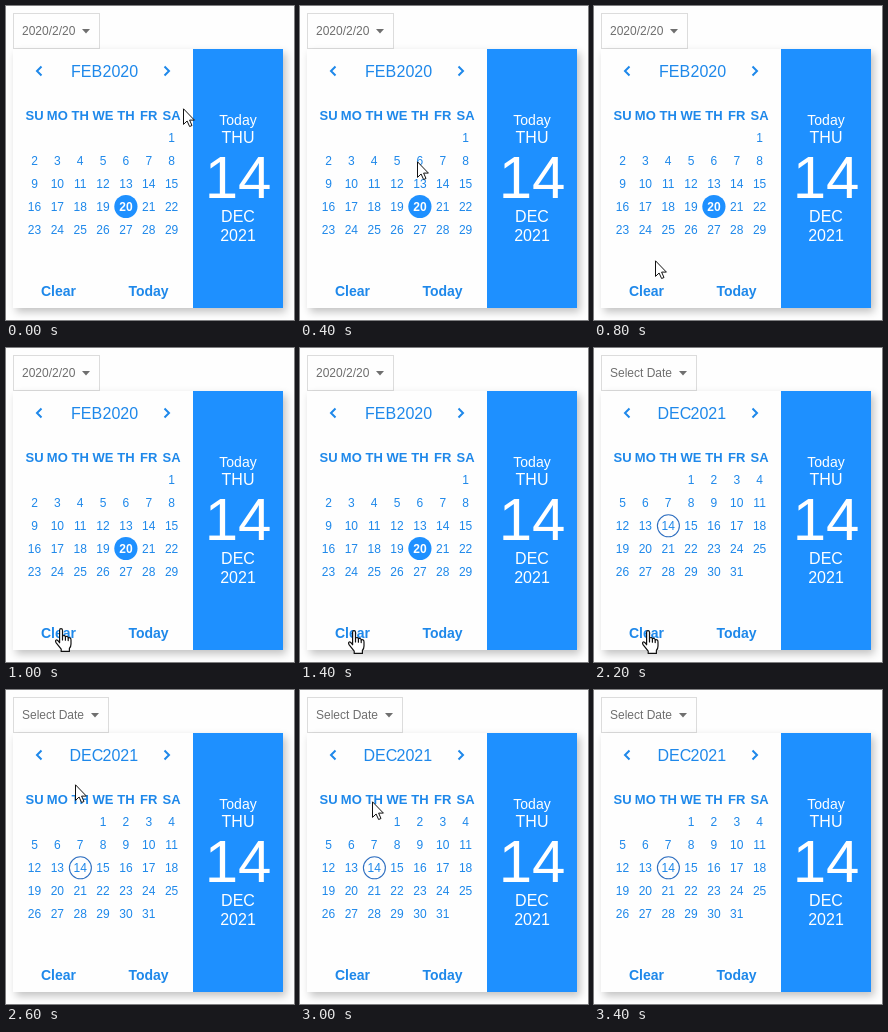
An HTML page that plays this animation: 288x314 px, repeating every 4 s.

```html
<!DOCTYPE html>
<html lang="en">
<head>
<meta charset="utf-8">
<title>Date picker</title>
<style>
html, body { margin: 0; width: 100%; height: 100%; overflow: hidden; background: #fefefe; }
#stage { position: absolute; left: 0; top: 0; width: 288px; height: 314px; overflow: hidden; }
#field { position: absolute; left: 7px; top: 7px; height: 36px; box-sizing: border-box; border: 1px solid #dcdcdc; }
#popup { position: absolute; left: 7px; top: 43px; width: 270px; height: 259px;
  background: linear-gradient(90deg, #fefefe 180px, #1e90ff 180px);
  box-shadow: 3px 4px 8px rgba(0, 0, 0, .24); }
svg { position: absolute; left: 0; top: 0; }
text { font-family: "Liberation Sans", Arial, sans-serif; }
</style>
</head>
<body>
<div id="stage">
  <div id="field"></div>
  <div id="popup"></div>
  <svg width="288" height="314" viewBox="0 0 288 314">
    <g id="base"></g>
    <g id="feb"></g>
    <g id="dec"></g>
    <path id="arrow" fill="#fff" stroke="#111" stroke-width="1"
      d="M.5 .8V16.4L4.1 13L6.6 18.5L9 17.5L6.6 12.1H11.4Z"/>
    <g id="hand" fill="#fff" stroke="#111" stroke-width="1.2" stroke-linejoin="round" stroke-linecap="round">
      <path d="M4.6 14.8V2.3Q4.6 .6 6 .6T7.5 2.3V8Q9.8 6.8 10.4 8.6Q12.7 7.8 13.2 9.8Q16 9.2 16 12V16Q16 18.6 14.4 20.4V23.4H6.2V21.2L1.2 14.8Q-.1 12.8 1.2 12Q2.5 11.4 4.6 14.8Z"/>
      <path d="M7.5 8V12M10.4 8.8V12.2M13.2 10V12.6" fill="none"/>
    </g>
  </svg>
</div>
<script>
const LOOP = 4000, STEP = 200, SWAP = 1800;
const BLUE = '#1e88ea', GRAY = '#6f6f6f';
const NS = 'http://www.w3.org/2000/svg';
const $ = id => document.getElementById(id);

function add(parent, tag, attrs, content) {
  const el = document.createElementNS(NS, tag);
  for (const k in attrs) el.setAttribute(k, attrs[k]);
  if (content !== undefined) el.textContent = content;
  parent.appendChild(el);
}

function label(parent, str, x, y, size, fill, weight = 400, anchor = 'middle') {
  add(parent, 'text', { x, y, fill, 'font-size': size, 'font-weight': weight, 'text-anchor': anchor }, str);
}

const colX = c => 28.5 + c * 22.85;
const rowY = r => 131.5 + r * 23;

function chevron(x, dir) {
  add($('base'), 'path', {
    d: `M${x + 4.5 * dir} 60.5L${x} 65L${x + 4.5 * dir} 69.5`,
    fill: 'none', stroke: BLUE, 'stroke-width': 2
  });
}

function drawBase() {
  const g = $('base');
  chevron(31, 1);
  chevron(163, -1);
  ['SU', 'MO', 'TH', 'WE', 'TH', 'FR', 'SA'].forEach((d, c) => label(g, d, colX(c), 114, 13, BLUE, 700));
  label(g, 'Clear', 52.5, 290, 14, BLUE, 700);
  label(g, 'Today', 142.5, 290, 14, BLUE, 700);
  [['Today', 119, 14], ['THU', 137, 16], ['14', 192, 60], ['DEC', 216, 16], ['2021', 235, 16]]
    .forEach(([s, y, size]) => label(g, s, 232, y, size, '#fff'));
}

function drawMonth(g, m) {
  label(g, m.field, 16, 29, 12, GRAY, 400, 'start');
  add(g, 'path', { d: `M${m.width - 18} 23h8l-4 4.6z`, fill: GRAY });
  label(g, m.name, m.nameX, 71, 16, BLUE, 400, 'start');
  label(g, m.year, 96.5, 71, 16, BLUE, 400, 'start');
  for (let d = 1; d <= m.days; d++) {
    const i = d - 1 + m.first, x = colX(i % 7), y = rowY(Math.floor(i / 7));
    const picked = d === m.picked;
    if (picked) add(g, 'circle', { cx: x, cy: y, r: 11.6, fill: '#1e90ff' });
    if (d === m.today) add(g, 'circle', { cx: x + .2, cy: y + .3, r: 11, fill: 'none', stroke: '#2f6fc0', 'stroke-width': 1.1 });
    label(g, d, x, y + 4.5, 12, picked ? '#fff' : BLUE, picked ? 700 : 400);
  }
}

drawBase();
drawMonth($('feb'), { field: '2020/2/20', width: 94, name: 'FEB', nameX: 65, year: 2020, first: 6, days: 29, picked: 20 });
drawMonth($('dec'), { field: 'Select Date', width: 103, name: 'DEC', nameX: 63.5, year: 2021, first: 3, days: 31, today: 14 });

// Pointer steps: start time, x, y, shape
const pointer = [
  [0, 177, 102, 'arrow'], [200, 148, 128, 'arrow'], [400, 117, 155, 'arrow'],
  [600, 84, 198, 'arrow'], [800, 61, 254, 'arrow'], [1000, 49, 280, 'hand'],
  [1200, 48, 282, 'hand'], [2400, 62, 185, 'arrow'], [2600, 69, 94, 'arrow'],
  [2800, 71, 103, 'arrow'], [3000, 72, 111, 'arrow'], [3200, 9, 215, 'arrow'],
  [3400, 0, 0, '']
];

function show(id, on) { $(id).style.display = on ? '' : 'none'; }

function render(t) {
  const cleared = t >= SWAP;
  show('feb', !cleared);
  show('dec', cleared);
  $('field').style.width = (cleared ? 96 : 87) + 'px';
  const [, x, y, shape] = pointer.filter(p => p[0] <= t).pop();
  for (const id of ['arrow', 'hand']) {
    show(id, id === shape);
    $(id).setAttribute('transform', `translate(${x} ${y})`);
  }
}

const start = performance.now();
function tick() {
  const t = (performance.now() - start) % LOOP;
  render(Math.floor(t / STEP) * STEP);
  requestAnimationFrame(tick);
}
tick();
</script>
</body>
</html>
```
